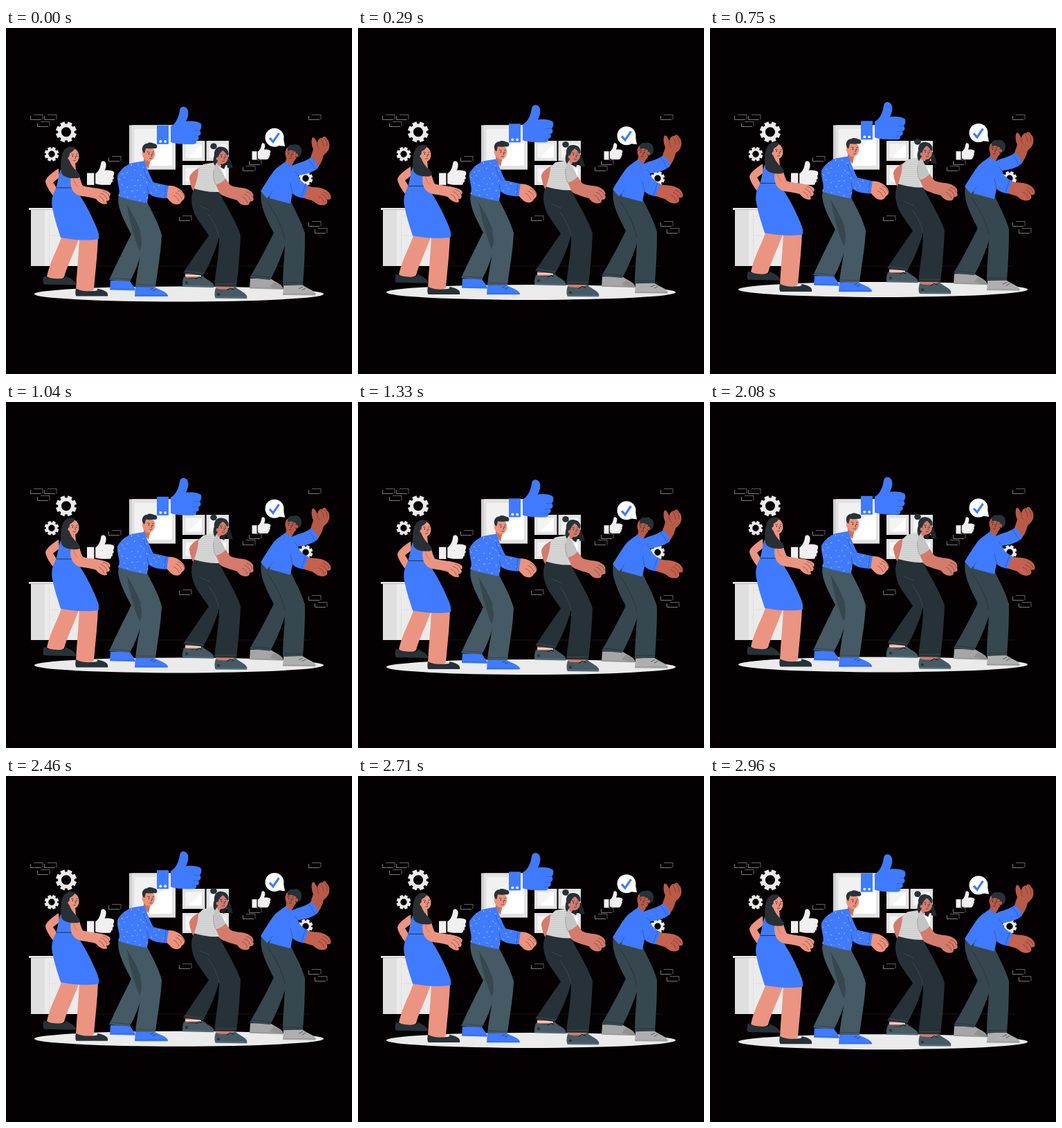
These frames come from a looping animation (500x500 px, 3000 ms). An HTML page with a canvas:

```html
<!DOCTYPE html>
<html lang="en">
<head>
<meta charset="utf-8">
<title>Team in step</title>
<style>
html, body { margin: 0; width: 100%; height: 100%; overflow: hidden; background: #050001; }
canvas { display: block; width: 100vw; height: 100vh; }
</style>
</head>
<body>
<canvas id="stage"></canvas>
<script>
const SIZE = 500, PERIOD = 1500, LIFT = 6.6, REST = 0.9;
const BACK = '#050001', BLUE = '#407bff', PALE = '#ebebeb', DARK = '#263238', SLATE = '#37474f', STEEL = '#455a64';
const canvas = document.getElementById('stage');
const ctx = canvas.getContext('2d');
const ratio = Math.max(1, window.devicePixelRatio || 1);
canvas.width = canvas.height = SIZE * ratio;

const cache = {};
const path = d => cache[d] || (cache[d] = new Path2D(d));

function fill(d, color) {
  ctx.fillStyle = color;
  ctx.fill(path(d));
}

function line(d, color = DARK, width = 0.7) {
  ctx.strokeStyle = color;
  ctx.lineWidth = width;
  ctx.stroke(path(d));
}

function rect(x, y, w, h, color) {
  ctx.fillStyle = color;
  ctx.fillRect(x, y, w, h);
}

function oval(x, y, rx, ry, color, turn = 0) {
  ctx.fillStyle = color;
  ctx.beginPath();
  ctx.ellipse(x, y, rx, ry, turn, 0, Math.PI * 2);
  ctx.fill();
}

function clipped(d, draw) {
  ctx.save();
  ctx.clip(path(d));
  draw();
  ctx.restore();
}

// ---- Room ----

function gear(x, y, r, hole) {
  const teeth = 8, step = Math.PI * 2 / teeth;
  ctx.beginPath();
  for (let i = 0; i < teeth; i++) {
    const a = i * step + step / 2;
    for (const [off, k] of [[-0.28, 0.78], [-0.22, 1], [0.22, 1], [0.28, 0.78]]) {
      ctx.lineTo(x + Math.cos(a + off) * r * k, y + Math.sin(a + off) * r * k);
    }
  }
  ctx.closePath();
  ctx.moveTo(x + hole, y);
  ctx.arc(x, y, hole, 0, Math.PI * 2);
  ctx.fillStyle = PALE;
  ctx.fill('evenodd');
}

function brick(x, y) {
  ctx.save();
  ctx.translate(x, y);
  line('M5 .5H18V7.5', '#8c8c8c', 0.7);
  line('M.5 2V7.5H16', '#b0b0b0', 0.7);
  ctx.restore();
}

function frame(x, y, w, h, edge) {
  rect(x, y, w, h, '#e3e3e3');
  rect(x + edge, y + edge, w - 2 * edge, h - 2 * edge, '#f4f4f4');
  ctx.fillStyle = '#fff';
  ctx.beginPath();
  ctx.moveTo(x + w - edge, y + edge);
  ctx.lineTo(x + w - edge, y + h - edge);
  ctx.lineTo(x + edge + w * 0.12, y + h - edge);
  ctx.fill();
}

function thumb(x, y, sx, sy, color, crease) {
  ctx.save();
  ctx.translate(x, y);
  ctx.scale(sx, sy);
  rect(0, 27, 17, 27, color);
  fill('M20 28C26 26 32 15 33 5C34-1 39-1 42 1C47 4 46 14 42 21C50 20 62 21 64 25' +
    'C65 29 64 32 62 34C65 38 63 41 60 42C62 46 60 48 57 49C58 53 55 54 51 54C39 54 29 54 20 51Z', color);
  line('M62 34H53M60 42H52M57 49H51', crease, 0.7);
  ctx.restore();
}

function room() {
  line('M130 344H440', '#202020', 0.8);

  rect(36, 263, 78, 81, '#dfdfdf');
  rect(55, 263, 59, 81, PALE);
  line('M55.5 263V344M62.5 266V342M62 300H114M62 272H114', '#dadada');
  rect(33, 260, 84, 2.8, PALE);

  rect(178, 140.4, 67, 64, '#d0d0d0');
  rect(182, 140.4, 63, 64, '#e3e3e3');
  rect(186, 146, 54, 53, '#f1f1f1');
  fill('M240 150V199H193Z', '#fff');
  for (const x of [255, 289.5]) for (const y of [163, 198]) frame(x, y, 32.5, 29, 4.5);

  gear(87, 150.3, 15.3, 7);
  gear(66, 182.3, 10.6, 4.7);
  gear(433, 217.3, 10.6, 4.7);

  [[35, 125], [55, 125], [45, 135], [148, 185], [250, 271], [351, 190],
   [342, 199], [437, 125], [437, 279], [446, 289]].forEach(p => brick(...p));

  thumb(117, 192.3, 0.61, 0.64, '#f0f0f0', '#d5d5d5');
  thumb(355.5, 166.3, 0.415, 0.44, '#f0f0f0', '#d5d5d5');
}

// ---- People ----

function face(x, y) {
  ctx.save();
  ctx.translate(x, y);
  oval(-2.6, 0, 0.7, 1, DARK);
  oval(3, 0.3, 0.7, 1, DARK);
  line('M-5-3L-1-2.3M2-2.2L5-3.2M.8 0L1.8 3.4L.2 3.6M-2 6.4Q0 7.2 2 6', DARK, 0.7);
  ctx.restore();
}

function fingers(x, y) {
  ctx.save();
  ctx.translate(x, y);
  line('M0-7Q7-6 9 1M-3-4Q4-2 6 5M-6 0Q0 2 2 9', 'rgba(70,25,25,.65)', 0.7);
  ctx.restore();
}

function firstWoman() {
  const skin = '#eb9481';
  fill('M76 202C68 207 57 215 57 221C58 228 66 240 73 247L78 238L68 222L77 215Z', skin);
  fill('M81 299C75 318 64 335 59 358C66 363 78 364 84 359C87 346 97 326 106 302Z', skin);
  fill('M106 301C105 328 102 353 101 378C110 383 121 382 127 377C129 353 132 329 133 301Z', skin);
  fill('M55 357C53 363 53 369.5 56 369.5L101 370.5C103 366 92 360 85 357Q88 360 82 361C73 362 62 361 55 357Z', DARK);
  fill('M101 375.5C100 380 100 386 102 386.6L147 386.6C149 380 140 377 132 375.5Q134 379 126 379C116 380 108 379 101 375.5Z', DARK);
  fill('M89 192L100 193L101 205L104 213L88 214L79 207Z', skin);
  fill('M79 203C76 211 75 222 72 231C67 240 65 249 67 259C70 275 75 289 79 302C96 305 115 307 134 304' +
    'C135 297 133 292 128 281C122 266 113 251 105 238L104 215L99 205L91 214Z', BLUE);
  line('M72.5 230H96', DARK, 1);
  fill('M97 205C93 213 92 224 95 231C98 238 103 241 110 242C118 243 125 244 130 246' +
    'C135 252 141 255 146 253C146 251 145 250 145 249C149 249 151 246 149 243C153 239 150 236 145 234' +
    'C137 230 120 230 111 227C107 220 106 208 101 205Z', skin);
  line('M97 213Q98 224 104 228', '#a85e55', 0.6);
  fingers(140, 242);
  oval(97, 184, 8.5, 11, skin, -0.12);
  fill('M104 178C102 169 88 168 83 177C79 184 78 198 80 208C82 214 91 217 104 216' +
    'C109 214 107 210 102 206C97 201 93 195 91 189L92 180C96 178 99 175 100 172Z', '#292f34');
  oval(91.5, 187, 2, 2.5, skin);
  face(99, 184);
}

const SHIRT = 'M182 194L200 191C204 202 208 213 213 222L235 227L232 245C222 245 212 243 206 238' +
  'L204 252C190 250 174 246 162 242C167 234 160 225 161 212C165 204 173 197 182 194Z';

function dashes() {
  for (let i = 0; i < 48; i++) {
    const x = 163 + (i % 8) * 9.2 + (Math.floor(i / 8) % 2) * 4;
    const y = 197 + Math.floor(i / 8) * 9.5 + (i * 5) % 7 - 2;
    const a = i * 2.4;
    ctx.strokeStyle = '#c3d5ff';
    ctx.lineWidth = 0.8;
    ctx.beginPath();
    ctx.moveTo(x, y);
    ctx.lineTo(x + Math.cos(a) * 2.4, y + Math.sin(a) * 2.4);
    ctx.stroke();
  }
}

function firstMan() {
  const skin = '#ed927c';
  fill('M151 364L150 377.5L187 378.5C187 373 182 371 179 364Z', BLUE);
  fill('M187 373L186 387H234C234 380 222 378 214 373Z', BLUE);
  line('M150.5 376H186M187 385.3H234', '#2c5fd0');
  line('M208 377L213 375M212 379L217 377', DARK);
  fill('M163 242C159 256 172 280 181 297C170 319 159 341 149 363L179 365.5C187 351 193 335 197 318L202 252Z', STEEL);
  fill('M175 256C179 282 186 304 193 321L200 304L190 275Z', SLATE);
  fill('M163 241L204 251C212 266 220 281 225 298C224 323 219 349 216 373.5L187 373.5C189 351 195 329 196 307' +
    'C195 290 186 273 174 254Z', STEEL);
  line('M151 360L180 362.5M188 370L216 370.5M174 254Q186 273 195 295', '#2f3e46');
  fill('M199 184L209 188L206 202L199 195Z', '#c9705e');
  fill('M234 227C243 226 252 231 256 237C260 242 258 247 254 249C252 255 245 255 240 252C236 248 233 245 232 244Z', skin);
  fingers(248, 241);
  fill(SHIRT, BLUE);
  clipped(SHIRT, dashes);
  line('M199 202Q202 215 209 223M206 238L204 228M231 227L229 244', '#244fac');
  oval(206, 180.5, 9.2, 11.2, skin, -0.1);
  fill('M198 178C195 173 198 166 204 166C208 163 213 166 217 167C220 171 218 174 213 173C208 174 205 173 202 173L200 181Z', DARK);
  oval(199.5, 182, 2, 2.6, skin);
  face(209, 181);
}

const TOP = 'M285 196L303 193C309 199 314 208 317 217C313 221 308 224 303 225L308 236' +
  'C295 237 283 234 272 231C274 225 278 213 278 203Z';

function secondWoman() {
  const skin = '#d47b6c';
  fill('M284 199C273 203 264 211 265 217C266 225 269 233 273 240L285 230L281 205Z', skin);
  rect(259, 354, 23, 6, skin);
  rect(259, 356, 23, 2, '#e8e8e8');
  rect(303, 371, 28, 7, skin);
  fill('M257 359C255 364 254 371 256 373L300 374C303 367 291 364 284 357L279 360C270 361 263 361 257 358Z', STEEL);
  fill('M303 375C301 380 301 388 303 389.6L348 390C351 383 338 379 331 373L325 376C317 377 309 377 303 375Z', STEEL);
  line('M256 371.5L300 372.5M302 388L348 388.5', '#71828a');
  line('M274 362L279 359L283 361M319 378L324 375L329 377', '#111', 1);
  oval(261, 367, 2, 2, DARK);
  oval(307, 384, 2, 2, DARK);
  fill('M272 231C264 244 269 264 278 277C283 285 289 292 293 299C280 317 268 335 256 353L285 357C294 340 302 323 307 304L306 237Z', DARK);
  fill('M272 231C284 235 297 237 308 236C318 256 331 276 339 298C338 323 336 349 333 373L301 372.5' +
    'C303 350 308 326 308 303C304 283 292 266 280 250Z', DARK);
  line('M280 256Q293 262 294 262M308 303Q305 285 292 268M258 350L286 354M303 369H333', '#45545b');
  fill('M301 222C303 231 307 238 313 241C320 244 328 246 334 248C338 254 345 257 351 254C352 252 352 251 352 250' +
    'C357 250 359 247 357 244C359 239 355 235 349 232C342 229 331 230 324 226L317 216Z', skin);
  fingers(347, 243);
  fill('M301 186L313 192L308 200L302 201Z', skin);
  fill(TOP, '#d9d9d9');
  clipped(TOP, () => {
    for (let y = 195; y < 239; y += 2.8) line(`M268 ${y}H303`, '#b2b4b6', 0.5);
    fill('M303 192L318 217L303 226Q298 214 300 204Z', '#c4c4c4');
  });
  line('M300 205Q299 218 303 225', '#888', 0.6);
  fill('M316 181C324 184 326 194 328 202L320 201L319 194L315 203L310 200Z', '#20272c');
  oval(312, 185, 9, 10.8, skin, -0.1);
  oval(300, 170, 4.8, 4.4, DARK);
  fill('M301 183C300 174 306 169 313 171C320 172 323 178 321 184C318 181 316 177 313 176' +
    'C309 179 306 184 306 191L302 198C299 194 299 188 301 183Z', DARK);
  oval(305.5, 188, 1.8, 2.4, skin);
  face(314, 185);
}

function secondMan() {
  const skin = '#b85a48', hand = '#c4614f';
  fill('M353 361L352 375.5L400 377C402 370 390 367 382 361Z', '#a6a6a6');
  fill('M381 373L387 366C394 369 400 371 400 376.5Z', '#919191');
  fill('M401 371L400 385L447 385.5C450 379 435 376 428 370Z', '#afafaf');
  line('M353 374.3L400 375.6M400 383.5H448', '#888');
  line('M423 376L429 373M428 378L433 375', DARK);
  fill('M369 236C365 253 378 278 387 295C376 317 364 340 352 360L382 363C391 346 399 327 405 307L410 248Z', SLATE);
  fill('M369 236L412 250C419 265 427 279 432 296C432 321 431 346 429 370.5H400C400 349 403 326 403 304C398 284 386 264 377 251Z', SLATE);
  line('M378 251Q398 279 403 304M354 356.5L383 359.5M401 367H429', '#222e34');
  fill('M439 189C441 183 443 178 444 174C441 168 441 160 443 157C447 157 448 162 450 165C451 159 455 157 457 158' +
    'C459 154 463 156 464 160C467 161 468 168 467 172C466 177 462 180 459 183C457 191 454 197 449 203Z', skin);
  line('M450 165Q449 171 453 174M455 159Q459 165 459 170M460 158Q465 163 464 170', '#7b3028');
  fill('M434 226C441 231 450 227 460 232C467 235 471 241 469 246C467 247 465 247 464 247C465 251 464 253 462 254' +
    'C456 257 449 254 444 249L428 244Z', hand);
  fingers(458, 243);
  fill('M406 185L417 190L412 200L403 196Z', skin);
  fill('M404 192C399 196 391 200 386 207C379 217 373 226 368 235L377 245L382 240L381 245L411 253L414 238' +
    'C418 242 424 244 430 245L437 227C430 224 424 219 422 212C432 211 444 208 451 201C450 194 446 190 441 186' +
    'C435 190 428 193 420 195L413 198Z', BLUE);
  line('M382 240L385 235M414 238L411 223M422 212L417 206M433 226L427 243M437 189Q443 195 446 203', '#244fac');
  oval(412, 181, 8.5, 11, skin, -0.15);
  fill('M408 177C405 171 410 166 415 168C421 165 428 171 427 178C427 184 422 187 418 186L419 178C415 177 412 174 408 177Z', DARK);
  oval(420, 183, 2, 2.7, skin);
  face(411, 181);
}

function bubble() {
  oval(388, 157.3, 13.5, 13.5, '#fff');
  fill('M401 159L403 170L391 168.5Z', '#fff');
  line('M381 158L386 163.5L394.5 151', BLUE, 3.2);
}

function crew() {
  oval(250, 383.6, 209, 11, PALE);
  thumb(218, 113, 1, 1, BLUE, '#2c5fd0');
  oval(223.3, 163, 1.9, 1.9, '#fff');
  oval(230.2, 163, 1.9, 1.9, '#fff');
  firstWoman();
  firstMan();
  secondWoman();
  bubble();
  secondMan();
}

function draw(now) {
  const phase = (now % PERIOD) / PERIOD;
  const rise = LIFT * (1 - Math.abs(1 - 2 * phase));
  ctx.setTransform(ratio, 0, 0, ratio, 0, 0);
  rect(0, 0, SIZE, SIZE, BACK);
  room();
  ctx.translate(0, REST - rise);
  crew();
}

const start = performance.now();
function tick() {
  draw(performance.now() - start);
  requestAnimationFrame(tick);
}
tick();
</script>
</body>
</html>
```
